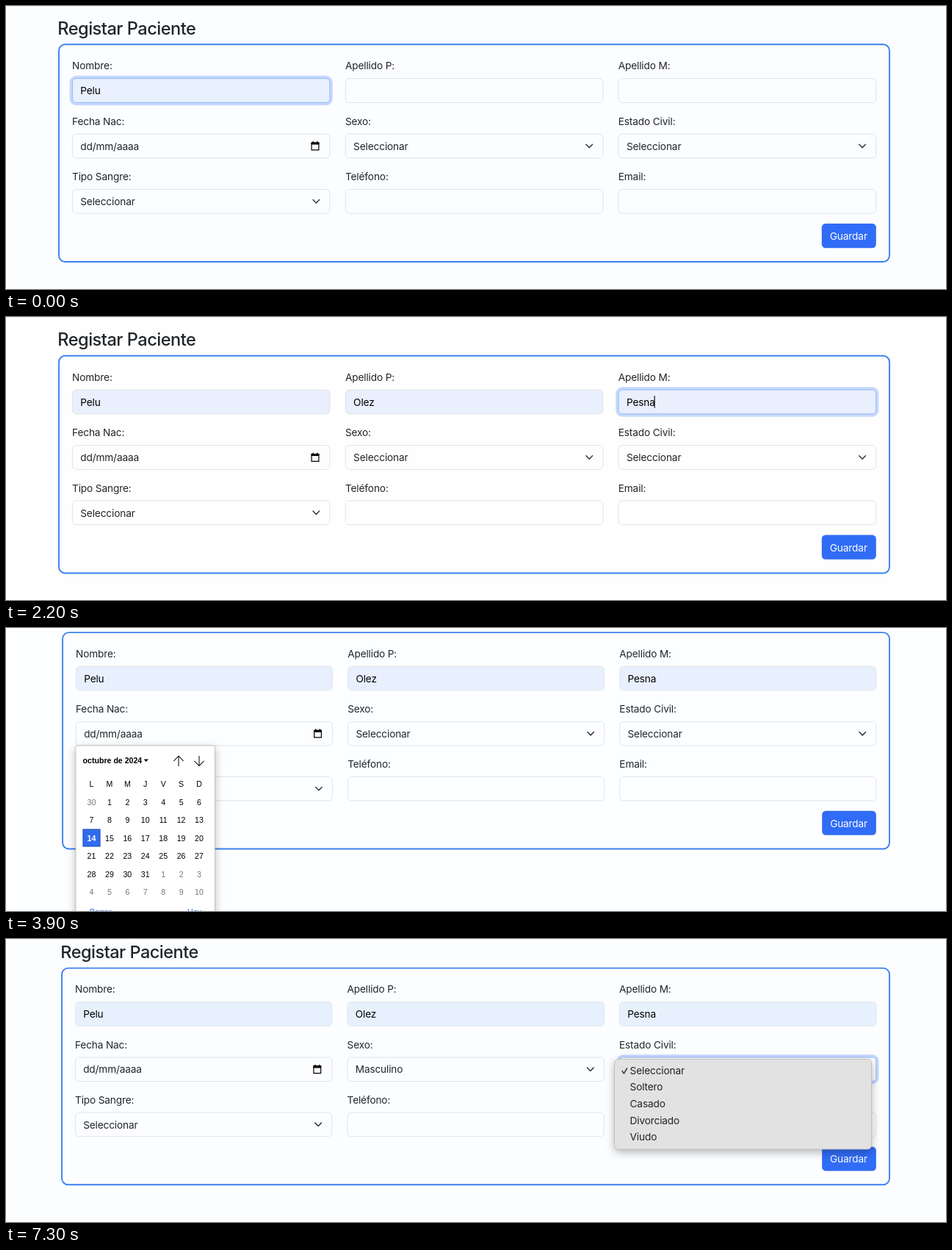
Recreate the animation shown at these times as an HTML page. Size 1280 by 385 pixels, loop 8 s.

```html
<!DOCTYPE html>
<html lang="es">
<head>
<meta charset="utf-8">
<title>Registro</title>
<style>
  html, body { margin: 0; width: 100%; height: 100%; overflow: hidden; background: #fcfdff; }
  svg { display: block; width: 1280px; height: 385px; }
  text { font: 13.7px Inter, sans-serif; letter-spacing: -.15px; fill: #212529; white-space: pre; }
  .title { font-size: 23.6px; font-weight: 500; letter-spacing: -.5px; }
  .filled { fill: #000; }
  .light { fill: #fff; }
  .card { fill: none; stroke: #3b82ef; stroke-width: 1.9; }
  .field { stroke: #dfe3e8; }
  .focused { stroke: #8fb6f8; }
  .ring { fill: none; stroke: #c6d9fc; stroke-width: 3.6; }
  .line { fill: none; stroke: #343a40; stroke-width: 1.5; stroke-linecap: round; stroke-linejoin: round; }
  .thin { stroke: #222; stroke-width: 1.15; }
  .white { stroke: #fff; }
  .popup { stroke: #b9b9b9; stroke-width: .8; filter: drop-shadow(0 4px 6px rgba(0, 0, 0, .28)); }
  .day { font: 10.6px "Liberation Sans", Arial, sans-serif; letter-spacing: 0; fill: #000; }
  .mid { text-anchor: middle; }
  .bold { font-weight: 700; }
  .dim { fill: #757575; }
  .link { fill: #306cf6; }
  .day.light { fill: #fff; }
</style>
</head>
<body>
<svg id="stage" viewBox="0 0 1280 385">
  <defs>
    <linearGradient id="glow" x2="0" y2="1">
      <stop offset="0" stop-color="#4a8cf3"/>
      <stop offset=".3" stop-color="#79aaf6"/>
      <stop offset="1" stop-color="#fcfdff"/>
    </linearGradient>
  </defs>
</svg>
<script>
const LOOP = 8000;
const RIGHT = 1203.5, CARD_TOP = 52.3;
const COLUMNS = [90.4, 462.3, 834.1], ROWS = [98.6, 174.1, 249.4];
const FIELD_W = 350.6, FIELD_H = 32.8;
const PERSON = ['Pelu', 'Olez', 'Pesna'];
const LABELS = ['Nombre:', 'Apellido P:', 'Apellido M:', 'Fecha Nac:', 'Sexo:', 'Estado Civil:',
  'Tipo Sangre:', 'Teléfono:', 'Email:'];

const text = (x, y, value, cls = '') => `<text x="${x}" y="${y}" class="${cls}">${value}</text>`;
const rect = (x, y, w, h, r, fill, cls = '') =>
  `<rect x="${x}" y="${y}" width="${w}" height="${h}" rx="${r}" fill="${fill}" class="${cls}"/>`;
const line = (d, cls = '') => `<path d="${d}" class="line ${cls}"/>`;

const chevron = (x, y) => line(`M${x - 4.3} ${y - 2.2}l4.3 4.4 4.3-4.4`);
const check = (x, y, cls = '') => line(`M${x - 3} ${y + .5}l2.3 3.4 4.2-7`, cls);

function calendarIcon(x, y) {
  return `<path d="M${x - 4.9} ${y - 4.6}h9.8v9.7h-9.8z" fill="none" stroke="#000" stroke-width="1.2"/>` +
    rect(x - 5.4, y - 5.2, 10.8, 3.1, .8, '#000') +
    rect(x - 3.6, y - 6.6, 1.4, 2, 0, '#000') + rect(x + 2.2, y - 6.6, 1.4, 2, 0, '#000');
}

function field(i, scene) {
  const x = COLUMNS[i % 3], y = ROWS[i / 3 | 0];
  const filled = i < scene.filled, focused = i === scene.focus;
  const selects = { 4: scene.sex || 'Seleccionar', 5: 'Seleccionar', 6: 'Seleccionar' };
  const value = filled ? PERSON[i] : i === 3 ? 'dd/mm/aaaa' : selects[i] || '';
  let out = text(x - .4, y - 12.3, LABELS[i]);
  if (focused) out += rect(x - 2, y - 2, FIELD_W + 4, FIELD_H + 4, 7, 'none', 'ring');
  out += rect(x, y, FIELD_W, FIELD_H, 5.2, filled ? scene.tint : scene.page, focused ? 'focused' : 'field');
  out += text(x + 10.8, y + 21.6, value, filled ? 'filled' : '');
  if (selects[i]) out += chevron(x + 332, y + 16.4);
  if (i === 3) out += calendarIcon(x + 330.6, y + 16.6);
  return out;
}

function form(scene) {
  const { scale, top } = scene;
  const shift = `translate(${RIGHT * (1 - scale)} ${top - CARD_TOP * scale}) scale(${scale})`;
  return `<g transform="${shift}">` +
    text(70.2, 38.6, 'Registar Paciente', 'title') +
    rect(72, CARD_TOP, 1131, 295.7, 8.5, 'none', 'card') +
    LABELS.map((_, i) => field(i, scene)).join('') +
    rect(1110.8, 296.1, 74, 33.2, 5.2, '#306cf6') +
    text(1121.8, 318, 'Guardar', 'light') + '</g>';
}

function dropdown(x, y, h, fill, items, highlight) {
  const base = y + 15.6;
  let out = rect(x, y, 350, h, 5.5, fill, 'popup');
  if (highlight) out += rect(x + 4.3, y + 4.2, 341.5, 22.8, 3.5, '#689cf8');
  out += check(x + 13.6, base, highlight ? 'white' : '');
  items.forEach((item, i) => {
    out += text(x + 21, base + 4.7 + i * 22.65, item, highlight && !i ? 'light' : '');
  });
  return out;
}

function datePicker() {
  const step = 24.42, left = 116.5;
  let out = rect(95, 160, 189.5, 250, 1, '#fff', 'popup') +
    text(104.6, 183.6, 'octubre de 2024', 'day bold') +
    '<path d="M187.6 178.4h6.4l-3.2 3.5z"/>' +
    line('M235 187.6v-13.4m-6.3 6.5l6.3-6.5 6.3 6.5', 'thin') +
    line('M263 174.2v13.4m-6.3-6.5l6.3 6.5 6.3-6.5', 'thin') +
    rect(105, 274, 23, 23, 0, '#306cf0', 'today');
  [...'LMMJVSD'].forEach((name, i) => out += text(left + i * step, 215.7, name, 'day mid'));
  for (let i = 0; i < 42; i++) {
    const day = i ? (i - 1) % 31 + 1 : 30;
    const tone = day === 14 ? 'bold light' : i === 0 || i > 31 ? 'dim' : '';
    out += text(left + i % 7 * step, 240.9 + (i / 7 | 0) * step, day, 'day mid ' + tone);
  }
  return out + text(114, 389.6, 'Borrar', 'day link') + text(247, 389.6, 'Hoy', 'day link');
}

const scenes = [
  { start: 0, scale: 1, top: 52.3, filled: 1, focus: 0, page: '#fcfdff', tint: '#e9f0fe',
    extra: () => rect(0, 0, 1280, 1, 0, '#f0f1f5') },
  { start: 500, scale: .9978, top: 56.4, filled: 2, focus: 1, page: '#fcfdff', tint: '#e7f1fe',
    extra: () => rect(0, 0, 1280, 5.5, 0, 'url(#glow)') },
  { start: 2200, scale: 1, top: 52.8, filled: 3, focus: 2, page: '#fefefe', tint: '#e9effc',
    extra: () => rect(0, 0, 1280, 1, 0, '#ebebfa') + rect(882.6, 107.2, 1.1, 16.6, 0, '#000') },
  { start: 3900, scale: .9955, top: 6.1, filled: 3, page: '#fdfeff', tint: '#e8f0fe', extra: datePicker },
  { start: 5600, scale: .9955, top: 50.3, filled: 3, focus: 4, page: '#fcfdff', tint: '#e7f1fe',
    extra: () => dropdown(458, 174.3, 77, '#e5e4e3', ['Seleccionar', 'Masculino', 'Femenino'], true) },
  { start: 7300, scale: .9964, top: 39.6, filled: 3, focus: 5, sex: 'Masculino', page: '#fcfdff', tint: '#e7f1fe',
    extra: () => dropdown(828.5, 163.5, 122.5, '#e2e2e2',
      ['Seleccionar', 'Soltero', 'Casado', 'Divorciado', 'Viudo']) }
];

// Opaque scenes stack up; each one appears at its start and stays until the loop restarts.
const style = document.createElement('style');
style.textContent = '.today { stroke: #2453b8; stroke-width: 1.2; }' + scenes.slice(1).map((scene, i) => `
  @keyframes show${i + 1} { 0% { opacity: 0 } ${scene.start / LOOP * 100}%, 100% { opacity: 1 } }
  #scene${i + 1} { animation: show${i + 1} ${LOOP}ms step-end infinite; }`).join('');
document.head.append(style);

document.getElementById('stage').insertAdjacentHTML('beforeend', scenes.map((scene, i) =>
  `<g id="scene${i}">${rect(0, 0, 1280, 385, 0, scene.page)}${form(scene)}${scene.extra()}</g>`).join(''));
</script>
</body>
</html>
```
